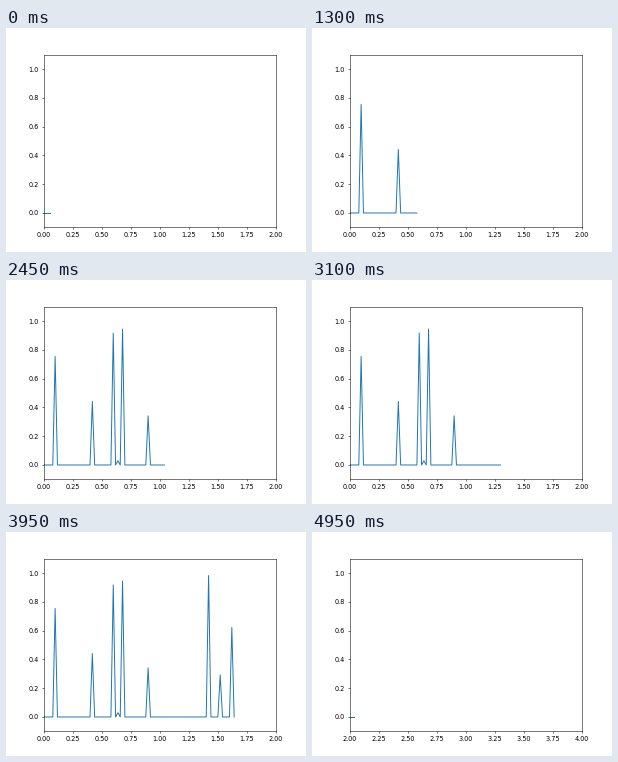
These frames come from a looping animation (300 px wide and 224 px high, 5000 ms). A matplotlib script:

```python
import numpy as np
import matplotlib.pyplot as plt
from matplotlib.animation import FuncAnimation

WIDTH, HEIGHT, DPI = 300, 224, 47
FRAMES, INTERVAL = 100, 50
DT, SPAN = 0.02, 2.0
SWEEP = round(SPAN / DT)   # samples per screen
LEAD = 3                   # samples already drawn when the loop starts


def make_signal(count, p=0.1, seed=1968080):
    """Mostly zeros, with a random spike at probability p."""
    rng = np.random.RandomState(seed)
    signal = [0.0]
    while len(signal) < count:
        signal.append(0.0 if rng.rand() > p else rng.rand())
    return np.array(signal)


signal = make_signal(FRAMES + LEAD)
times = np.arange(len(signal)) * DT

fig, ax = plt.subplots(figsize=(WIDTH / DPI, HEIGHT / DPI), dpi=DPI)
ax.set_ylim(-0.1, 1.1)
ax.set_xlim(0, SPAN)
line, = ax.plot([], [], color="tab:blue")
ax.set_ylim(-0.1, 1.1)
ax.set_xlim(0, SPAN)


def update(frame):
    last = frame + LEAD
    start = (last - 1) // SWEEP * SWEEP
    line.set_data(times[start:last + 1], signal[start:last + 1])
    ax.set_xlim(start * DT, start * DT + SPAN)
    return line,


anim = FuncAnimation(fig, update, frames=FRAMES, interval=INTERVAL,
                     init_func=lambda: update(0), repeat=True)
plt.show()
```
